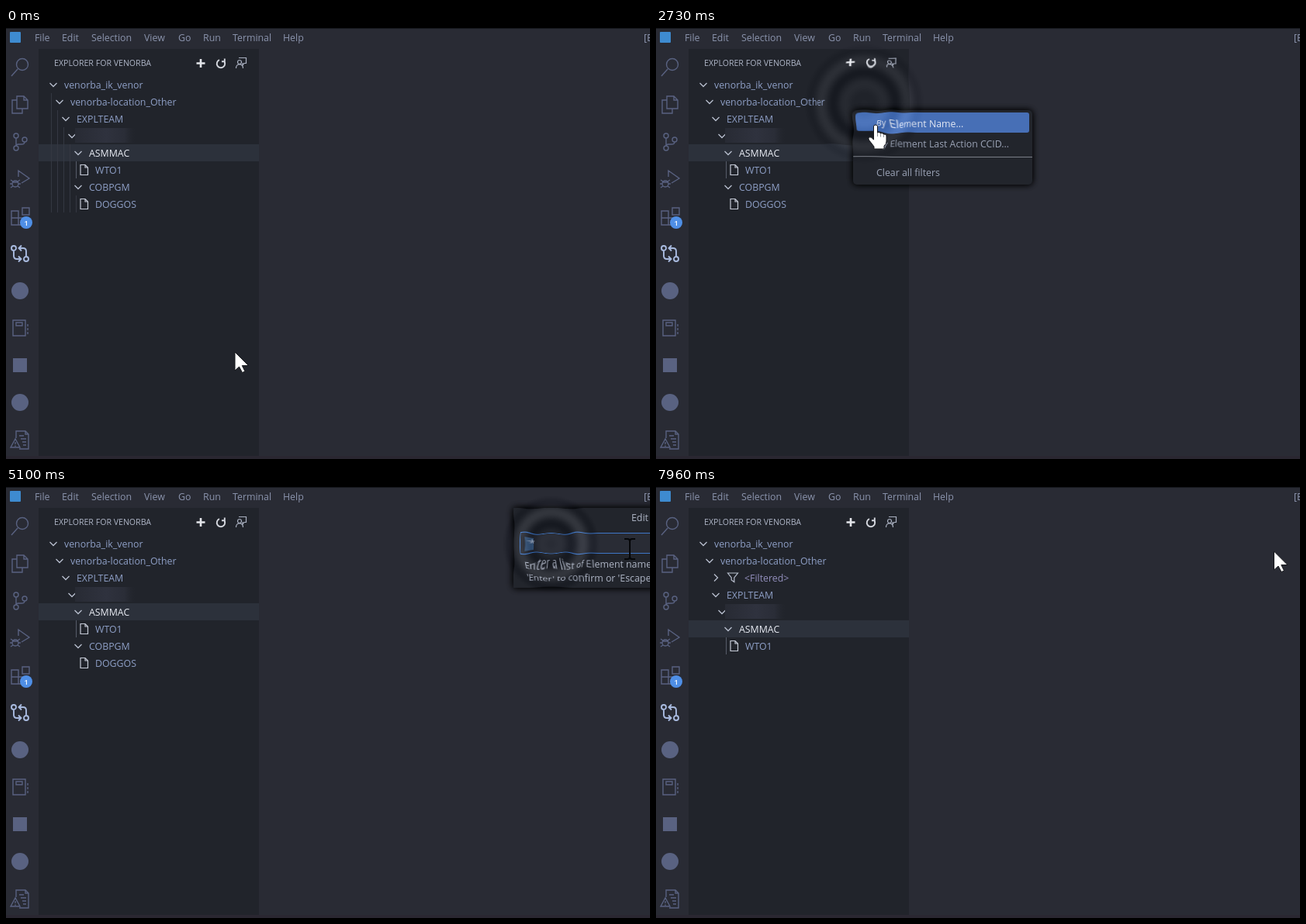
Recreate the animation shown at these times as an HTML page with a canvas. Size 830 px wide and 556 px high, loop 8 s.

```html
<!DOCTYPE html>
<html lang="en">
<head>
<meta charset="utf-8">
<title>Filter elements by name</title>
<style>
  html, body { margin: 0; width: 830px; height: 556px; overflow: hidden; background: #292b34; }
  canvas { display: block; }
</style>
</head>
<body>
<canvas id="stage" width="830" height="556"></canvas>
<script>
const W = 830, H = 556, LOOP = 8000;
const ctx = document.getElementById('stage').getContext('2d', { willReadFrequently: true });
const FONT = '"Open Sans", "Noto Sans", sans-serif';
const TEXT = '#8e9fc6', BRIGHT = '#e9ecf4', DIM = '#596281';

// Cursor stops: time, x, y
const STOPS = [
  [60, 295, 418], [810, 281, 114], [1180, 280, 97], [1420, 280, 97],
  [1670, 268, 97], [2150, 268, 97], [2600, 283, 125], [3520, 283, 125],
  [4200, 700, 71], [4560, 700, 71], [5080, 804, 80]
];
// Clicks: time, x, y
const CLICKS = [[1850, 268, 97], [2950, 284, 128], [4450, 702, 73]];
const RIPPLE_MS = 1080;

const clamp = (v, a = 0, b = 1) => Math.min(b, Math.max(a, v));
const ramp = (t, a, b) => clamp((t - a) / (b - a));
const ease = p => p * p * (3 - 2 * p);
const between = (t, a, b) => t >= a && t < b;

function rect(x, y, w, h, color) {
  ctx.fillStyle = color;
  ctx.fillRect(x, y, w, h);
}

function box(x, y, w, h, r, color) {
  ctx.fillStyle = color;
  ctx.beginPath();
  ctx.roundRect(x, y, w, h, r);
  ctx.fill();
}

function disc(x, y, r, color) {
  ctx.fillStyle = color;
  ctx.beginPath();
  ctx.arc(x, y, r, 0, 7);
  ctx.fill();
}

function text(s, x, y, color = TEXT, size = 12.35, weight = 400) {
  ctx.font = `${weight} ${size}px ${FONT}`;
  ctx.fillStyle = color;
  ctx.fillText(s, x, y);
}

function icon(d, x, y, color, width = 1.2, fill) {
  const path = new Path2D(d);
  ctx.save();
  ctx.translate(x, y);
  if (fill) {
    ctx.fillStyle = fill;
    ctx.fill(path);
  }
  ctx.strokeStyle = color;
  ctx.lineWidth = width;
  ctx.stroke(path);
  ctx.restore();
}

// Popup panel with a dense dark halo
function panel(x, y, w, h, r) {
  ctx.save();
  ctx.shadowColor = 'rgba(0,0,0,.8)';
  ctx.shadowBlur = 9;
  box(x, y, w, h, r, '#22252c');
  box(x, y, w, h, r, '#22252c');
  ctx.restore();
}

const ring = (x, y, r) => `M${x + r} ${y}a${r} ${r} 0 1 1 ${-2 * r} 0a${r} ${r} 0 1 1 ${2 * r} 0z`;

const ICON = {
  search: ring(3, -4, 7.5) + 'M-3 2L-11 11',
  files: 'M-4 -11H5L10 -6V5H-4ZM5 -11V-6H10M-4 -6H-10V11H3V5',
  branch: ring(-5, -8, 3) + ring(6, -3, 3) + ring(-5, 8, 3) + 'M-5 -5V5M6 0Q6 3 2 3H-2Q-5 3 -5 5',
  debug: 'M-2 -3V-11L12 -1L2 5' + ring(-6, 6, 4) + 'M-10 4H-2M-12 1L-9 3M-13 6H-10M-12 11L-9 9M0 1L-3 3M1 6H-2M0 11L-3 9',
  blocks: 'M-11 -7H-2V2H7V11H-11ZM-11 2H-2V11M3 -11H12V-2H3Z',
  compare: ring(-8, -7, 3) + ring(8, 7, 3) + 'M-1 -7H4Q8 -7 8 -3V3M2 -10.5L-1.5 -7L2 -3.5M1 7H-4Q-8 7 -8 3V-3M-2 3.5L1.5 7L-2 10.5',
  book: 'M-9 -10H7V10H-9ZM-5 -7H3V-3H-5ZM10 -5V-2M10 0V3M10 5V8',
  report: 'M-5 -2V-11H7L11 -7V12H-1M7 -11V-7H11M-1 -5H5M1 -1H8M3 3H8M4 7H8M-6 -1L-12 10H0ZM-6 3V6M-6 7.5V9',
  funnel: 'M-6.5 -6H6.5L1.8 0V5.5L-1.8 3V0Z',
  up: 'M0 6V-5.5M-5 -1L0 -6L5 -1',
  newFile: 'M1 6H-6V-6.5H1L4.5 -3V1M1 -6.5V-3H4.5M4 2V8M1 5H7',
  file: 'M-5 -6.5H1L4.5 -3V6.5H-5ZM1 -6.5V-3H4.5',
  open: 'M-4.5 -2L0 2.5L4.5 -2',
  closed: 'M-2 -4.5L2.5 0L-2 4.5',
  arrow: 'M0 0V24L5.5 19L9.5 26.5L13 25L9.3 17.5H17.5Z',
  hand: 'M-2.5 2Q-2.5 0 0 0Q2.5 0 2.5 2V10Q5 8.5 6.5 11Q9 9.8 10.5 12.2Q14 11.5 14 15V21Q14 25 11 27V31H-2V28L-8.5 19.5Q-10 17 -7.5 15.8Q-5.5 15.3 -2.5 19Z',
  beam: 'M-7 -13H-3Q0 -13 0 -10Q0 -13 3 -13H7M0 -11V11M-7 13H-3Q0 13 0 10Q0 13 3 13H7'
};

const TREE = [
  ['venorba_ik_venor', 0], ['venorba-location_Other', 1], ['EXPLTEAM', 2], ['', 3],
  ['ASMMAC', 4], ['WTO1', 5], ['COBPGM', 4], ['DOGGOS', 5]
];
const FILTERED = [...TREE.slice(0, 2), ['<Filtered>', 2], ...TREE.slice(2, 6)];

function cursorAt(t) {
  let a = STOPS[0];
  for (const b of STOPS) {
    if (t < b[0]) {
      const p = ease(ramp(t, a[0], b[0]));
      return { x: a[1] + (b[1] - a[1]) * p, y: a[2] + (b[2] - a[2]) * p };
    }
    a = b;
  }
  return { x: a[1], y: a[2] };
}

function drawFrame() {
  rect(0, 0, W, H, '#292b34');
  rect(42, 27, 284, 525, '#21242b');
  rect(0, 0, W, 1, '#15171c');
  rect(0, 552, W, 4, '#2a2731');
  box(5, 5, 14, 14, 1, '#3e8bd0');
  const menu = { File: 37, Edit: 72, Selection: 110, View: 178, Go: 222, Run: 254, Terminal: 292, Help: 357, '[E': 822 };
  for (const name in menu) text(name, menu[name], 17, '#8b94ad');

  const bar = ['search', 'files', 'branch', 'debug', 'blocks', 'compare', '', 'book', '', '', 'report'];
  bar.forEach((name, i) => {
    const active = name === 'compare';
    if (name) icon(ICON[name], 18, 51 + 48 * i, active ? '#a9bbe0' : DIM, active ? 1.9 : 1.4);
  });
  disc(18, 339, 11, DIM);
  rect(9, 426, 18, 18, DIM);
  disc(18, 483, 11, DIM);
  disc(26, 251, 8, '#4f8fe6');
  text('1', 23.5, 254.5, '#fff', 9, 600);

  text('EXPLORER FOR VENORBA', 62, 49, '#aeb5c6', 10.6);
  icon('M-5.5 0H5.5M0 -5.5V5.5', 251, 45.5, '#e3e5ea', 2.6);
  icon('M-2 -4.8A5.2 5.2 0 1 0 3.5 -3.8M4.8 -6.5V-2.8H1', 277, 46, '#d5d8df', 1.9);
  icon(ring(-2, -1, 2.5) + 'M-6.5 7Q-6.5 2 -2 2Q2.5 2 2.5 7M-3 -6.5H6.5V0.5H4L2 3V0', 303, 45, '#aab1c1');
}

function hoverRow(t, c) {
  if (t >= 2050) return -1;
  if (t >= 870) return 1;
  const i = Math.floor((c.y + 16 - 62) / 22);
  return i < TREE.length ? i : -1;
}

function drawTree(t, c) {
  const rows = t >= 7280 ? FILTERED : TREE;
  const hover = hoverRow(t, c);
  const guides = t < 3000 ? 1 - ramp(t, 2060, 2200) : ramp(t, 3050, 3150) - ramp(t, 3700, 3820);

  rows.forEach(([name, depth], i) => {
    const top = 62 + 22 * i, y = top + 11;
    const focus = name === 'ASMMAC', leaf = depth === 5, filter = name === '<Filtered>';
    if (focus) rect(42, top, 284, 22, '#2c313b');
    if (hover === i) rect(42, top, 284, 22, '#354e7c');

    ctx.globalAlpha = guides;
    for (let d = 0; d < depth; d++) rect(58 + 8 * d, top, 1, 22, '#343842');
    ctx.globalAlpha = 1;
    if (name === 'WTO1') rect(90, top, 1, 22, '#575c69');

    if (leaf) icon(ICON.file, 101, y, '#c5cad6');
    else icon(filter ? ICON.closed : ICON.open, 61 + 8 * depth, y, '#b8bfce', 1.3);
    if (filter) icon(ICON.funnel, 99, y, '#b8bfce');

    if (!name) {
      const g = ctx.createLinearGradient(89, 0, 169, 0);
      g.addColorStop(0, '#282b34');
      g.addColorStop(.5, '#2f323e');
      g.addColorStop(.8, '#2a2d37');
      g.addColorStop(1, 'rgba(33,36,43,0)');
      rect(89, top + 1, 80, 19, g);
    }
    const x = leaf ? 115 : filter ? 114 : 75 + 8 * depth;
    text(name, x, y + 5, focus || hover === i ? BRIGHT : filter ? '#938fbd' : TEXT);
  });

  if (hover === 1) {
    if (t >= 1540) box(254, 85, 20, 20, 4, '#4170c2');
    icon(ICON.funnel, 264, 95, '#c9d2e6');
    icon(ICON.up, 285, 95, '#c9d2e6');
    icon(ICON.newFile, 305, 95, '#c9d2e6');
  }
}

function drawMenu(c) {
  panel(254, 106, 231, 96, 5);
  const hot = c.y > 109;
  if (hot) box(258, 109, 223, 26, 3, '#476fb6');
  text('By Element Name...', 284, 128, hot ? '#e4e9f4' : '#9aa2b5');
  text('By Element Last Action CCID...', 284, 154, '#9aa2b5');
  rect(254, 166, 231, 1, '#7b7f88');
  text('Clear all filters', 284, 191, '#9aa2b5');
}

function drawPrompt(t) {
  panel(654, 27, 190, 103, 0);
  text('Edit', 806, 44, '#aeb5c5');
  rect(665, 59, 180, 27, '#292c35');
  ctx.strokeStyle = between(t, 4500, 5500) ? '#3f77c8' : '#747a80';
  ctx.lineWidth = 1;
  ctx.strokeRect(665.5, 59.5, 180, 26);

  const typed = t < 5560 ? '*' : t < 5820 ? 'W' : t < 6420 ? 'WT' : 'WT*';
  if (t < 5560) rect(671, 65, 6, 17, '#3b5678');
  text(typed, 672, 77, '#a6afc2');
  if (between(t, 5560, 6960)) rect(Math.round(672 + ctx.measureText(typed).width), 64, 1, 17, '#c6ccd9');

  text('Enter a list of Element name', 670, 104, '#aeb5c5');
  text("'Enter' to confirm or 'Escape", 670, 122, '#aeb5c5');
}

// Water ring: radial displacement plus a shade, bilinear sampling
function ripple(cx, cy, age) {
  const R = 21 + 65 * age * RIPPLE_MS / 1000;
  const x0 = Math.max(0, Math.floor(cx - R)), y0 = Math.max(0, Math.floor(cy - R));
  const w = Math.min(W, Math.ceil(cx + R)) - x0, h = Math.min(H, Math.ceil(cy + R)) - y0;
  const from = ctx.getImageData(x0, y0, w, h), src = from.data;
  const to = ctx.createImageData(w, h), out = to.data;
  const power = Math.min(1, age * 6) * Math.sqrt(1 - age);

  for (let y = 0; y < h; y++) {
    for (let x = 0; x < w; x++) {
      const dx = x + x0 - cx, dy = y + y0 - cy, r = Math.hypot(dx, dy) || 1;
      const o = (y * w + x) * 4;
      let sx = x, sy = y, shade = 0;
      if (r < R) {
        const q = r / R;
        const phase = (R - r) / 33 * 2 * Math.PI;
        const push = 5.5 * power * Math.sin(Math.PI * q) * Math.sin(phase);
        sx = clamp(x + dx / r * push, 0, w - 1.01);
        sy = clamp(y + dy / r * push, 0, h - 1.01);
        shade = -26 * power * Math.sin(Math.PI * q ** 1.5) * Math.cos(phase - 1.1);
      }
      const ix = Math.floor(sx), iy = Math.floor(sy), fx = sx - ix, fy = sy - iy;
      const a = (iy * w + ix) * 4, b = a + (fx ? 4 : 0), below = fy ? w * 4 : 0;
      for (let k = 0; k < 3; k++) {
        const high = src[a + k] * (1 - fx) + src[b + k] * fx;
        const low = src[a + below + k] * (1 - fx) + src[b + below + k] * fx;
        out[o + k] = high * (1 - fy) + low * fy + shade;
      }
      out[o + 3] = 255;
    }
  }
  ctx.putImageData(to, x0, y0);
}

function drawCursor(t, c) {
  if (t >= 7960) return icon(ICON.arrow, 796.5, 83, '#15171b', 1, '#fff');
  if (c.x > 665) return icon(ICON.beam, c.x, c.y, '#050608', 2);
  if (c.x < 326 && c.y < 222) {
    icon(ICON.hand, c.x, c.y, '#15171b', 1, '#fff');
    return icon('M2.5 10V15M6.5 11.5V15.5M10.5 13V16', c.x, c.y, '#70757d', .8);
  }
  icon(ICON.arrow, c.x, c.y, '#15171b', 1, '#fff');
}

function render(t) {
  const c = cursorAt(t);
  drawFrame();
  drawTree(t, c);
  if (between(t, 2050, 3020)) drawMenu(c);
  if (between(t, 3250, 7210)) drawPrompt(t);
  for (const [start, x, y] of CLICKS) {
    const age = (t - start) / RIPPLE_MS;
    if (age > 0 && age < 1) ripple(x, y, age);
  }
  drawCursor(t, c);
}

const begin = performance.now();
function tick() {
  render((performance.now() - begin) % LOOP);
  requestAnimationFrame(tick);
}
tick();
</script>
</body>
</html>
```
